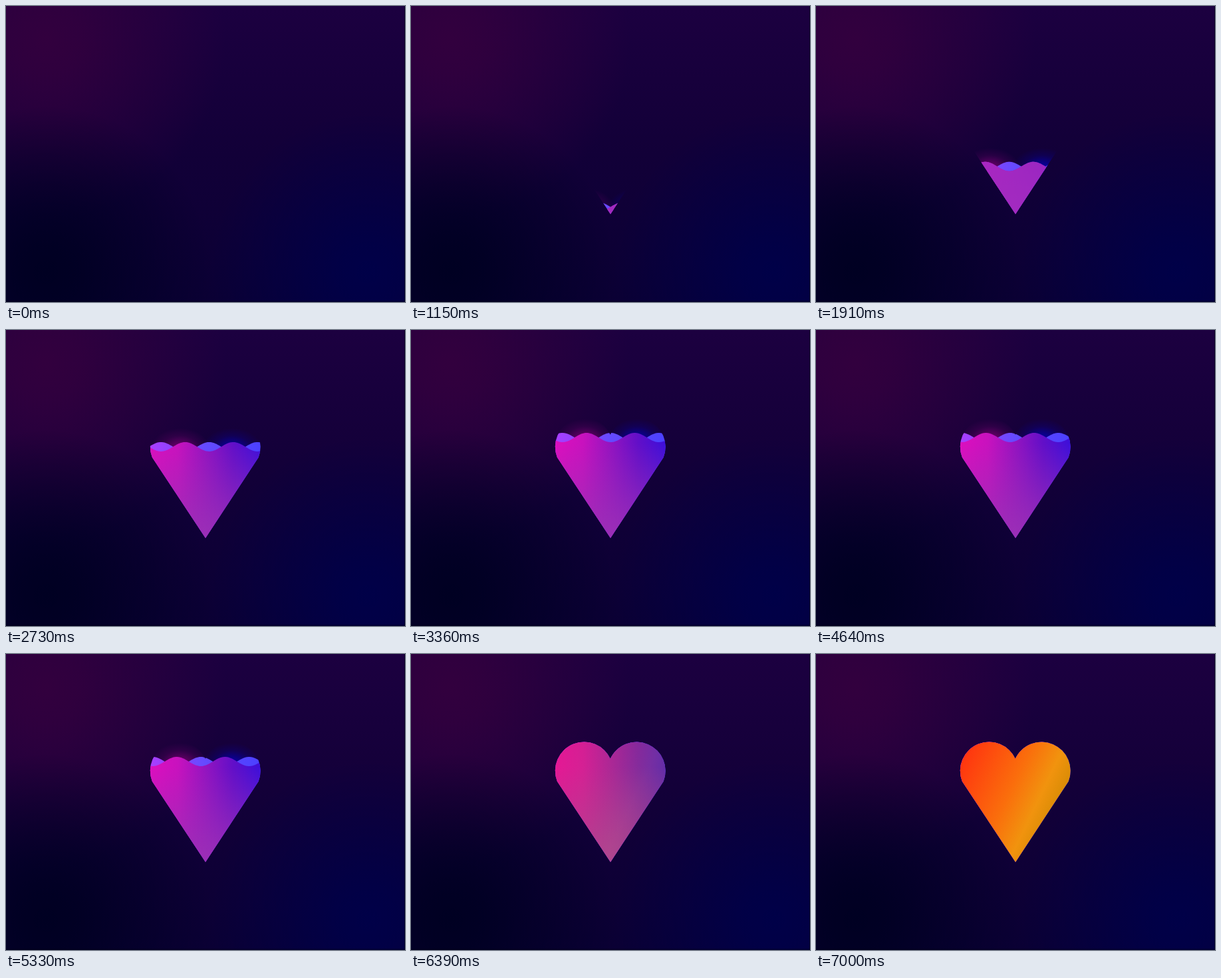
An HTML page with a canvas for the animation above (9090 ms loop, 600x446 px).

```html
<!DOCTYPE html>
<html lang="en">
<head>
<meta charset="utf-8">
<title>Filling heart</title>
<style>
  html, body { margin: 0; width: 100%; height: 100%; overflow: hidden; background: #12003a; }
  canvas { display: block; }
</style>
</head>
<body>
<canvas id="stage" width="600" height="446"></canvas>
<script>
const WIDTH = 600, HEIGHT = 446, LOOP = 9090;
const FILL_START = 850, WARM_START = 6200, WARM_END = 7000;
const WAVE = { length: 72.5, height: 7, speed: 0.1067, crest: 256.5, crestTime: 3970 };
// Liquid surface: time, height; the last leg of the first rise slows down.
const LEVELS = [[850, 327], [2730, 176], [2820, 169.8], [2910, 165.4], [3000, 162.8],
                [3080, 162], [5400, 162], [5910, 120]];

const ctx = document.getElementById('stage').getContext('2d');
const clamp = v => Math.min(1, Math.max(0, v));
const rgba = (c, a = 1) => `rgba(${c},${a})`;

function addStops(gradient, stops) {
  stops.forEach(([at, color]) => gradient.addColorStop(at, color));
  return gradient;
}
const linear = (x0, y0, x1, y1, stops) =>
  addStops(ctx.createLinearGradient(x0, y0, x1, y1), stops);

function fillBox(style, x = 0, y = 0, w = WIDTH, h = HEIGHT) {
  ctx.fillStyle = style;
  ctx.fillRect(x, y, w, h);
}

function blob(x, y, radius, color) {
  const stops = [[0, rgba(color)], [0.2, rgba(color, 0.88)], [1, rgba(color, 0)]];
  fillBox(addStops(ctx.createRadialGradient(x, y, 0, x, y, radius), stops));
}

const rad = deg => deg * Math.PI / 180;
const heart = new Path2D();
heart.moveTo(300, 313.5);
heart.arc(260.3, 176, 43.5, rad(158.4), rad(336.4));
heart.arc(339.2, 176, 43.5, rad(203.6), rad(381.6));
heart.closePath();

const liquid = linear(217, 0, 383, 0, [
  [0, 'rgb(220,15,190)'], [0.25, 'rgb(200,18,190)'], [0.5, 'rgb(148,20,192)'],
  [0.75, 'rgb(98,15,200)'], [1, 'rgb(60,15,218)']]);
const depth = linear(0, 170, 0, 310, [[0, 'rgba(155,45,182,0)'], [1, 'rgba(155,48,182,.95)']]);
const crestTint = linear(217, 0, 383, 0, [
  [0, 'rgb(170,62,255)'], [0.5, 'rgb(100,74,255)'], [1, 'rgb(75,64,255)']]);
const warm = linear(217, 150, 383, 230, [
  [0.05, 'rgb(255,55,15)'], [0.5, 'rgb(250,110,12)'],
  [0.74, 'rgb(241,147,14)'], [0.9, 'rgb(217,140,5)']]);

function levelAt(t) {
  const i = LEVELS.findIndex(([time]) => time > t);
  if (i < 0) return LEVELS[LEVELS.length - 1][1];
  const [t0, y0] = LEVELS[i - 1], [t1, y1] = LEVELS[i];
  return y0 + (y1 - y0) * (t - t0) / (t1 - t0);
}

function wavePath(level, crest) {
  const path = new Path2D();
  path.moveTo(210, 320);
  for (let x = 210; x <= 390; x++) {
    path.lineTo(x, level - WAVE.height * Math.cos(2 * Math.PI * (x - crest) / WAVE.length));
  }
  path.lineTo(390, 320);
  path.closePath();
  return path;
}

function drawGlow(level) {
  const rows = 32;
  const tints = [[262, '150,0,130'], [340, '0,0,215']];
  for (const [x, color] of tints) {
    ctx.save();
    ctx.translate(x, level + 4);
    ctx.scale(45, rows);
    const glow = addStops(ctx.createRadialGradient(0, 0, 0, 0, 0, 1), [
      [0, rgba(color, 0.75)], [0.3, rgba(color, 0.5)],
      [0.65, rgba(color, 0.16)], [1, rgba(color, 0)]]);
    fillBox(glow, -1, -1, 2, 2);
    ctx.restore();
  }
}

function drawBackground() {
  fillBox(linear(0, 0, 0, HEIGHT, [
    [0, 'rgb(28,0,64)'], [0.5, 'rgb(18,0,56)'], [1, 'rgb(10,0,52)']]));
  blob(60, 50, 270, '50,0,62');
  blob(60, 400, 250, '0,0,34');
  blob(545, 400, 240, '0,0,72');
  fillBox('rgba(0,0,20,.6)', WIDTH - 1, 0, 1, HEIGHT);
  fillBox('rgba(0,0,20,.35)', 0, HEIGHT - 2, WIDTH, 2);
}

function drawHeart(t) {
  const level = levelAt(t);
  const crest = WAVE.crest + WAVE.speed * (t - WAVE.crestTime);
  const front = wavePath(level, crest);
  ctx.save();
  ctx.clip(heart);
  drawGlow(level);
  ctx.fillStyle = crestTint;
  ctx.fill(wavePath(level, crest + WAVE.length / 2));
  // A shallow pool is a more even purple than a full one.
  const shallow = 0.75 * clamp((level - 180) / 60);
  for (const style of [liquid, depth, rgba('165,42,195', shallow)]) {
    ctx.fillStyle = style;
    ctx.fill(front);
  }
  ctx.restore();

  ctx.globalAlpha = clamp((t - WARM_START) / (WARM_END - WARM_START));
  ctx.fillStyle = warm;
  ctx.fill(heart);
  ctx.globalAlpha = 1;
}

function draw() {
  const t = performance.now() % LOOP;
  drawBackground();
  if (t >= FILL_START) drawHeart(t);
  requestAnimationFrame(draw);
}
draw();
</script>
</body>
</html>
```
